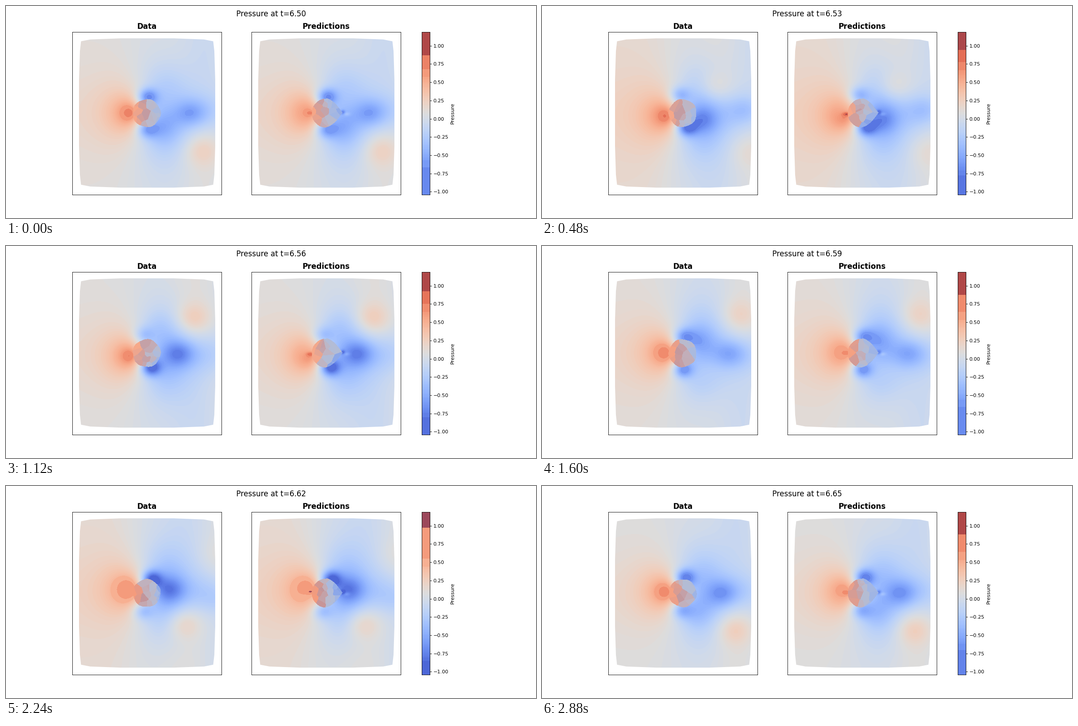
Recreate the animation shown at these times as a matplotlib script. Size 1183 by 473 pixels, loop 3.04 s.

```python
import numpy as np
import matplotlib
import matplotlib.pyplot as plt
from matplotlib.animation import FuncAnimation
from matplotlib.patches import Polygon

W, H, DPI = 1183, 473, 80
FRAMES, STEP_MS = 19, 160
OMEGA = 2 * np.pi / FRAMES             # one shedding period per loop
P_MIN, P_MAX = -1.04, 1.19
CX, CY, SHIFT = 315, 239, 400          # cylinder centre, distance between panels
LEFT, RIGHT, TOP, BOTTOM = 160, 470, 70, 408
AX_TOP, AX_BOTTOM = 57.7, 421
COOLWARM = matplotlib.colormaps["coolwarm"]

X, Y = np.meshgrid(np.arange(LEFT, RIGHT) + 0.5 - CX,
                   np.arange(TOP, BOTTOM) + 0.5 - CY)


def wave(t, peak, order=1):
    return np.cos(order * OMEGA * (t - peak))


def bell(u):
    return np.exp(-u ** 2)


def blob(x, y, sx, sy):
    return bell((X - x) / sx) * bell((Y - y) / sy)


def mean_flow(t):
    """Raised pressure upstream, low pressure around the body and in the wake."""
    upstream = 1 / (1 + np.exp((X + 40) / 25))
    level = .115 + .06 * bell(Y / 90) + .04 * wave(t, 3.2, 2)
    return (level * upstream - .55 * blob(35, 0, 60, 90)
            - .22 * blob(130, 0, 60, 45))


def stagnation(t):
    distance = np.hypot(X + 38, Y - 8 * wave(t, 4.9))
    return .8 * np.exp((10 - np.hypot(distance, 10)) / 34)


def travelling_swing(t):
    delay = 12.8 + .00032 * X * np.abs(X)
    return .09 * np.tanh(Y / 50) * bell((X - 100) / 90) * wave(t, delay)


def suction(t, side):
    turn = wave(t, 5)
    depth = .53 + .25 * wave(t, 6)
    return -depth * blob(10 * turn, side * (36 - 5 * turn), 22, 19)


def vortex(t, side):
    age = (t + 3) % FRAMES - 3
    x, y = 25 + 4 * age + .4 * age ** 2, .5 * (age - 8.5) ** 2
    return -.38 * bell((age - 6) / 6) * blob(x, side * y, 33, 28)


def crest(t, side):
    age = (t - 7) % FRAMES - 2.5
    x, y = 45 + 8 * age, 92 - 68 * np.exp(-age / 4.5)
    return .25 * bell((age - 6) / 6.5) * blob(x, side * y, 38, 34)


def pressure(t):
    field = mean_flow(t) + stagnation(t) + travelling_swing(t)
    # the upper side repeats the lower one half a period later
    for side, phase in ((1, t), (-1, t + FRAMES / 2)):
        field += suction(phase, side) + vortex(phase, side) + crest(phase, side)
    return field


def predicted(field, t):
    spike = .32 + .13 * wave(t, 4.7, 2)
    return (field - .14 * blob(-42, 0, 18, 18)
            + spike * blob(-35, 3 * wave(t, 4.9), 8, 4)
            - .35 * blob(37, -2, 5, 5) + .15 * blob(45, 2, 8, 4))


def palette(t):
    """Band limits and band colours; the bands at both ends are wide."""
    low = -.765 - .1 * wave(t, 5.2, 2)
    mid = .67 + .12 * wave(t, 4.5)
    top = .92 + .05 * wave(t, 4.75, 2)
    fine = np.arange(low + .3 * (1 + low), mid - .11, .0223)
    limits = np.concatenate([[P_MIN, low], fine, [mid - .11, mid, top, P_MAX]])
    centres = (limits[1:] + limits[:-1]) / 2
    centres[0], centres[-2] = low - .04, mid + .07
    colours = COOLWARM((centres - P_MIN) / (P_MAX - P_MIN))[:, :3] * 255
    violet = 20 * max(0, wave(t, 4.75, 2)) ** 2
    colours[-1] = 176 - violet, 72, 72 + violet
    return limits[1:-1], colours


def paint(values, bands):
    limits, colours = bands
    return colours[np.digitize(values, limits)]


def body_mask(t, pointed):
    if not pointed:
        rim = 31 + .8 * np.cos(5 * np.arctan2(Y, X) + t)
        return np.hypot(X + 1, Y) < rim
    taper = 32 * (1 - (np.clip(X, 0, 36) / 36) ** 1.7)
    return np.where(X > 0, np.abs(Y + 1) < taper, np.hypot(X, Y) < 32.5)


def add_facets(rgb, field, t, rng, bands, pointed):
    """Flat cells over the cylinder, tinted by its translucent disc."""
    n = 20
    radius, angle = 33 * np.sqrt(rng.random(n)), 2 * np.pi * rng.random(n)
    sx, sy = radius * np.cos(angle), radius * np.sin(angle)
    local = field[(sy + CY - TOP).astype(int), (sx + CX - LEFT).astype(int)]
    p = .55 + .6 * local - .014 * sx + .07 * rng.standard_normal(n)
    if pointed:
        p -= .2 * (sx > -10)
    tint = (.4 * np.clip((sx + 26) / 16, 0, 1))[:, None]
    cells = (paint(np.clip(p, -.5, .55), bands) * (1 - tint)
             + np.array([120, 140, 200]) * tint)
    inside = body_mask(t, pointed)
    gaps = np.hypot(X[inside][:, None] - sx, Y[inside][:, None] - sy)
    rgb[inside] = cells[gaps.argmin(axis=1)]


def render(t):
    rng = np.random.default_rng(100 + t)
    bands = palette(t)
    data = pressure(t)
    images = []
    for field, pointed in ((data, False), (predicted(data, t), True)):
        rgb = paint(field, bands)
        add_facets(rgb, data, t, rng, bands, pointed)
        images.append(rgb.astype(np.uint8))
    column = np.linspace(P_MAX, P_MIN, 364)[:, None]
    images.append(paint(column, bands).astype(np.uint8))
    return images


def mesh_outline():
    """One rounded corner, mirrored into all four quadrants."""
    corner = np.array([(152, 74), (150, 138), (147.5, 160), (127, 164), (60, 166.5)])
    quads = [corner, corner[::-1] * (-1, 1), corner * (-1, -1), corner[::-1] * (1, -1)]
    return np.concatenate(quads) + (CX, CY - .3)


def pixel_axes(x0, x1):
    return fig.add_axes([x0 / W, 1 - AX_BOTTOM / H,
                         (x1 - x0) / W, (AX_BOTTOM - AX_TOP) / H])


def panel(title, pixels, shift):
    x0, x1 = 148.3 + shift, 481.4 + shift
    ax = pixel_axes(x0, x1)
    ax.set_title(title, fontsize=15, fontweight="bold")
    image = ax.imshow(pixels, interpolation="nearest", aspect="auto",
                      extent=(LEFT + shift, RIGHT + shift, BOTTOM, TOP))
    ax.set(xlim=(x0, x1), ylim=(AX_BOTTOM, AX_TOP), xticks=[], yticks=[])
    image.set_clip_path(Polygon(mesh_outline() + (shift, 0), transform=ax.transData))
    return image


def colour_bar(pixels):
    ax = pixel_axes(927.7, 945.9)
    image = ax.imshow(pixels, interpolation="nearest", aspect="auto",
                      extent=(0, 1, P_MIN, P_MAX))
    ax.set(xticks=[], yticks=np.arange(-1, 1.01, .25))
    ax.yaxis.tick_right()
    ax.yaxis.set_label_position("right")
    ax.tick_params(labelsize=10)
    ax.set_ylabel("Pressure", fontsize=10)
    return image


scenes = [render(t) for t in range(FRAMES)]

fig = plt.figure(figsize=(W / DPI, H / DPI), dpi=DPI, facecolor="white")
heading = fig.suptitle("", fontsize=15, y=.981)
first = scenes[0]
pictures = [panel("Data", first[0], 0), panel("Predictions", first[1], SHIFT),
            colour_bar(first[2])]


def draw(k):
    heading.set_text(f"Pressure at t={6.5036 + .0083 * k:.2f}")
    for picture, pixels in zip(pictures, scenes[k]):
        picture.set_data(pixels)
    return [heading, *pictures]


anim = FuncAnimation(fig, draw, frames=FRAMES, interval=STEP_MS,
                     repeat=True, repeat_delay=0, blit=False)
plt.show()
```
